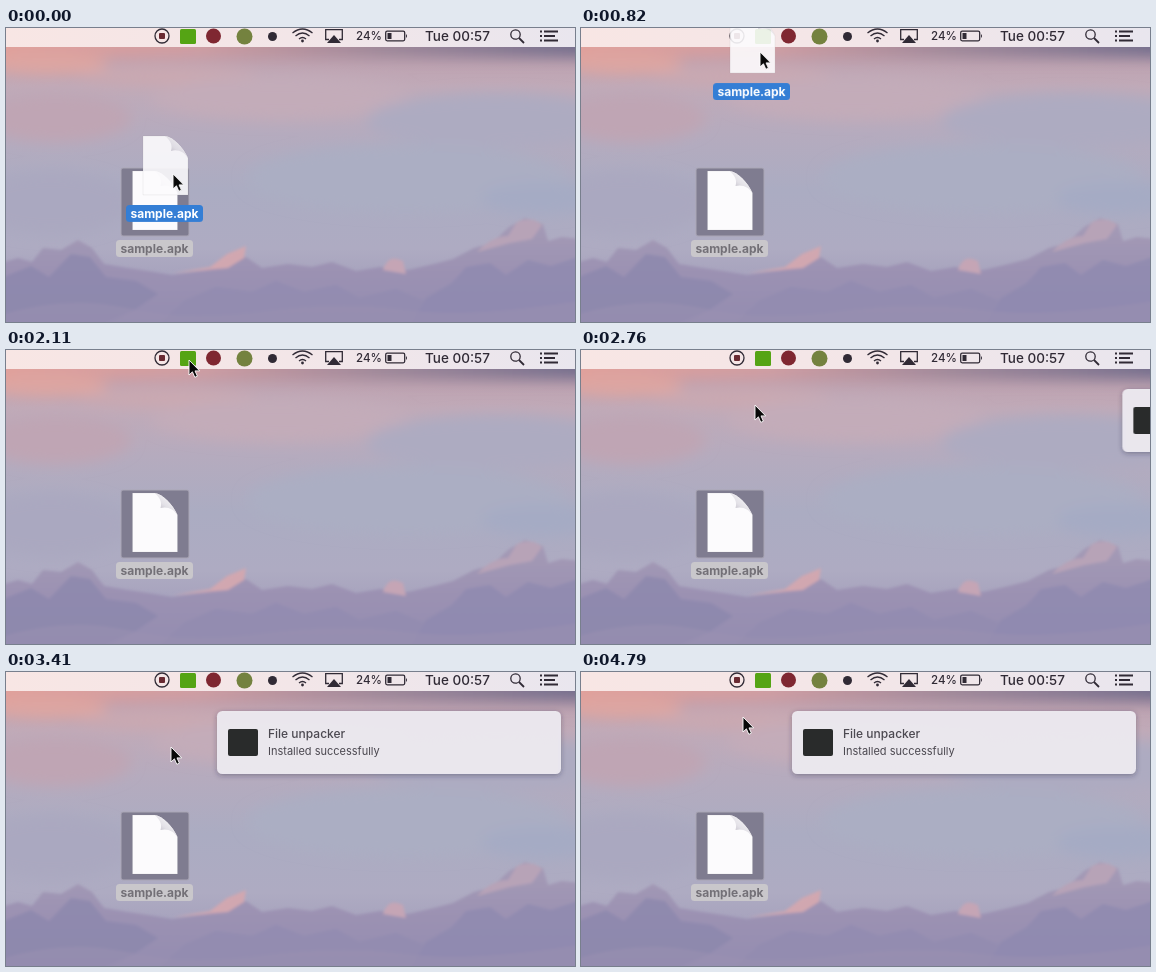
An HTML page for the animation above (4.89 s loop, 569 by 294 pixels).

```html
<!DOCTYPE html>
<html lang="en">
<head>
<meta charset="utf-8">
<title>Drag to install</title>
<style>
  html, body { margin: 0; width: 100%; height: 100%; overflow: hidden; }
  svg { display: block; width: 569px; height: 294px; }
  text { font-family: Inter, Roboto, sans-serif; }
  .label { font-size: 12px; font-weight: 700; text-anchor: middle; }
  .menu { font-weight: 500; fill: #302a35; }
  .ink { fill: none; stroke: #302a35; stroke-width: 1.3; }
  .solid { fill: #302a35; stroke: none; }
</style>
</head>
<body>
<svg viewBox="0 0 569 294">
  <defs>
    <linearGradient id="sky" x2="0" y2="1">
      <stop offset=".07" stop-color="#bd9fad"/>
      <stop offset=".2" stop-color="#c0aab8"/>
      <stop offset=".36" stop-color="#b5abbe"/>
      <stop offset=".55" stop-color="#abacc2"/>
      <stop offset=".75" stop-color="#aeabc2"/>
      <stop offset="1" stop-color="#9c96b6"/>
    </linearGradient>
    <linearGradient id="duskBand">
      <stop offset="0" stop-color="#e3a19a"/>
      <stop offset=".35" stop-color="#cf9da2"/>
      <stop offset=".65" stop-color="#9d8799"/>
      <stop offset="1" stop-color="#716c8c"/>
    </linearGradient>
    <linearGradient id="hills" x2="0" y2="1">
      <stop offset="0" stop-color="#a59bb6"/>
      <stop offset=".5" stop-color="#9b91b2"/>
      <stop offset="1" stop-color="#938cb0"/>
    </linearGradient>
    <linearGradient id="bar">
      <stop offset="0" stop-color="#f8e6e4"/>
      <stop offset=".5" stop-color="#f3e6e8"/>
      <stop offset="1" stop-color="#e9e6ee"/>
    </linearGradient>
    <linearGradient id="fold" x1=".75" y1=".2" x2=".25" y2=".8">
      <stop offset="0" stop-color="#f4f3f6"/>
      <stop offset=".6" stop-color="#e3e1e7"/>
      <stop offset="1" stop-color="#c3c0ca"/>
    </linearGradient>
    <filter id="soft" x="-30%" y="-60%" width="160%" height="220%"><feGaussianBlur stdDeviation="7"/></filter>
    <filter id="edge" x="-10%" y="-10%" width="120%" height="120%"><feGaussianBlur stdDeviation="1.5"/></filter>
    <filter id="shade" x="-10%" y="-30%" width="120%" height="160%">
      <feDropShadow dx="0" dy="1.5" stdDeviation="2.5" flood-color="#2c2840" flood-opacity=".38"/>
    </filter>
    <g id="page">
      <path d="M0 0H22C30 1 40 11 45 22V59H0Z" fill="#fcfbfd" stroke="#777" stroke-opacity=".18" stroke-width=".6"/>
      <path d="M22 0C27 4 30 9 28 15C35 13 41 16 45 22C40 11 30 1 22 0Z" fill="url(#fold)"/>
    </g>
  </defs>

  <!-- evening sky -->
  <rect width="569" height="294" fill="url(#sky)"/>
  <g filter="url(#soft)">
    <rect x="-30" y="2" width="630" height="28" fill="url(#duskBand)"/>
    <ellipse cx="40" cy="37" rx="62" ry="10" fill="#dda6a2"/>
    <ellipse cx="160" cy="48" rx="90" ry="9" fill="#cba9b1"/>
    <ellipse cx="50" cy="90" rx="75" ry="24" fill="#bfa5b4"/>
    <ellipse cx="275" cy="70" rx="130" ry="22" fill="#c3acb9"/>
    <ellipse cx="490" cy="93" rx="130" ry="28" fill="#adabc1"/>
    <ellipse cx="400" cy="150" rx="160" ry="34" fill="#abaec3"/>
    <ellipse cx="45" cy="175" rx="80" ry="32" fill="#aaa8c0"/>
    <ellipse cx="535" cy="170" rx="60" ry="16" fill="#a5abc4"/>
  </g>
  <g filter="url(#edge)">
    <path d="M-5 235L12 230L26 234L37 220L55 222L72 212L86 220L98 236L122 240L142 243L166 247L202 242L222 234L240 229L256 240L282 236L306 239L326 234L350 243L374 239L402 242L428 236L447 231L468 220L486 215L503 199L519 190L537 196L542 213L556 209L575 211V300H-5Z" fill="url(#hills)"/>
    <path d="M-5 250L25 238L43 249L65 226L84 229L100 249L130 253L152 266L130 281L90 300H-5Z" fill="#8b87ad" opacity=".75"/>
    <path d="M402 300L420 270L446 255L460 239L484 235L500 247L522 232L545 238L575 228V300Z" fill="#8d89af" opacity=".7"/>
    <path d="M150 300L178 273L210 259L246 264L270 253L298 264L330 257L353 270L390 261L420 274L400 300Z" fill="#928bb0" opacity=".75"/>
    <path d="M-5 287Q60 267 120 280T260 283T400 282T575 273V300H-5Z" fill="#9b91b2" opacity=".5"/>
    <path d="M167 245L204 239L221 226L240 218L238 230L222 240Z" fill="#d1a7b0"/>
    <path d="M377 242Q382 225 397 233L400 246Z" fill="#c5a5b5"/>
    <path d="M471 224Q486 208 502 208L511 194Q526 188 536 197L526 211L504 215Z" fill="#b7a3b7"/>
  </g>

  <!-- file left in place -->
  <rect x="115" y="140" width="68" height="68" rx="2" fill="#7f7c90" stroke="#aaa6b5"/>
  <use href="#page" x="126.500" y="143"/>
  <rect x="110" y="212" width="77" height="17" rx="3.500" fill="#c9c7cb"/>
  <text class="label" x="148.500" y="225" fill="#737077">sample.apk</text>

  <!-- notification -->
  <g id="notice">
    <rect width="344" height="63" rx="5.500" fill="#ece9f0" fill-opacity=".97" filter="url(#shade)"/>
    <rect x="11" y="18" width="30" height="27" rx="2" fill="#292b2b"/>
    <text x="51" y="27" font-size="12" font-weight="500" fill="#4c4951">File unpacker</text>
    <text x="51" y="44" font-size="11" fill="#4a474f">Installed successfully</text>
  </g>

  <!-- menu bar -->
  <rect width="569" height="19" fill="url(#bar)"/>
  <g class="ink">
    <circle cx="156" cy="8" r="7"/>
    <rect x="153" y="5" width="6" height="6" rx="1" fill="#692a32" stroke="none"/>
    <rect x="174" y="1" width="16" height="15" rx="1.500" fill="#55a414" stroke="none"/>
    <circle cx="207.500" cy="8" r="7.500" fill="#7f2731" stroke="none"/>
    <circle cx="238.500" cy="8.500" r="8" fill="#74823f" stroke="none"/>
    <circle class="solid" cx="266.500" cy="8.500" r="4.500"/>
    <path d="M286.500 5Q296.500 -3 306.500 5M289.500 8Q296.500 2 303.500 8M293 11Q296.500 8 300 11"/>
    <circle class="solid" cx="296.500" cy="13" r="1.400"/>
    <path d="M323 11.500H319.700V1.700H336.300V11.500H333"/>
    <path class="solid" d="M328 7L335 15H321Z"/>
    <rect x="379.700" y="3.200" width="19" height="9.600" rx="1.500"/>
    <path class="solid" d="M381.500 5H385.500V11H381.500ZM400 6Q402 8 400 10Z"/>
    <circle cx="509.500" cy="6.500" r="4.700"/>
    <path d="M513 10L518 15" stroke-width="1.800"/>
    <path d="M534 3.500H536M538 3.500H552M534 8H536M538 8H549M534 12.500H536M538 12.500H552" stroke-width="1.900"/>
  </g>
  <text class="menu" x="350" y="12" font-size="11.500">24%</text>
  <text class="menu" x="419" y="13" font-size="13.500">Tue 00:57</text>

  <!-- pointer and dragged file -->
  <g id="pointer">
    <g id="cargo">
      <use href="#page" x="-30" y="-38" opacity=".9"/>
      <rect x="-47" y="31" width="77" height="17" rx="3.500" fill="#347ed5"/>
      <text class="label" x="-8.500" y="44" fill="#fff">sample.apk</text>
    </g>
    <path d="M0 0V15L3.400 11.800L5.800 17.300L8.400 16.200L6 10.900H10.700Z" fill="#080808" stroke="#fff" stroke-width=".9"/>
  </g>
</svg>
<script>
const LOOP = 4890;
const DROP = 1900;

const move = ([time, x, y, easing = 'linear']) =>
  ({ offset: time / LOOP, transform: `translate(${x}px, ${y}px)`, easing });

const play = (id, frames) =>
  document.getElementById(id).animate(frames, { duration: LOOP, iterations: Infinity });

// time, x, y, easing towards the next stop
const pointerPath = [
  [0, 167, 146, 'cubic-bezier(.3,.2,.7,.7)'],
  [520, 173, 77],
  [820, 179, 24, 'ease-out'],
  [1110, 183, 10],
  [2170, 183, 10, 'ease-in-out'],
  [2760, 174, 55, 'ease-out'],
  [3410, 165, 75],
  [3810, 164, 72, 'ease-in-out'],
  [4640, 162, 45],
  [LOOP, 162, 45]
];

const noticePath = [
  [0, 580, 39],
  [2700, 573, 39, 'cubic-bezier(.42,.24,.4,1)'],
  [3230, 211, 39],
  [LOOP, 211, 39]
];

play('pointer', pointerPath.map(move));
play('notice', noticePath.map(move));
play('cargo', [
  { offset: 0, opacity: 1 },
  { offset: DROP / LOOP, opacity: 1 },
  { offset: DROP / LOOP, opacity: 0 },
  { offset: 1, opacity: 0 }
]);
</script>
</body>
</html>
```
